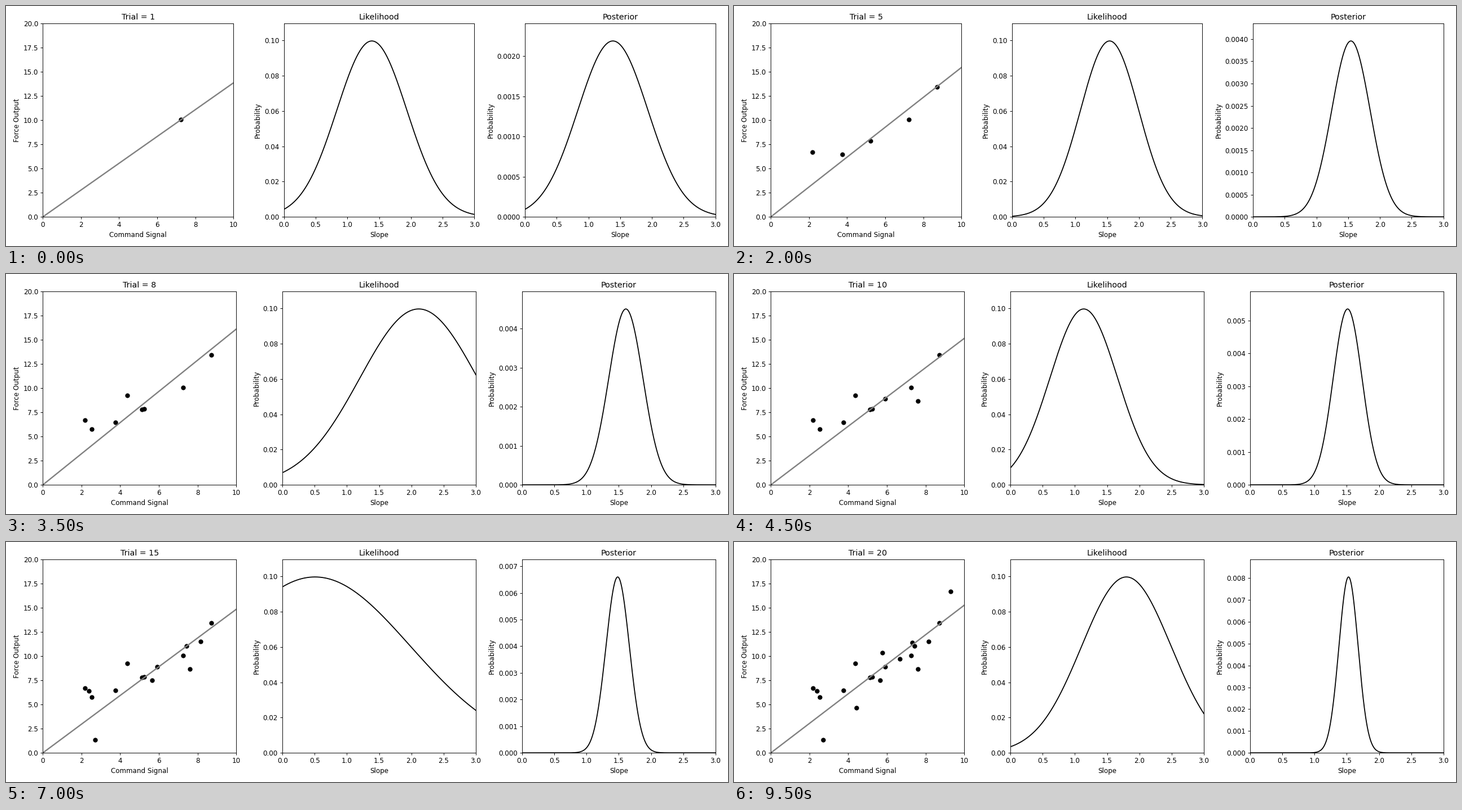
Animation of 1280x427 px, one loop 10000 ms. Source, as a matplotlib script:

```python
import numpy as np
import matplotlib.pyplot as plt
from matplotlib.animation import FuncAnimation

DPI = 256 / 3
SIZE = (15, 427 * 3 / 256)  # 1280 x 427 pixels
NOISE_SD = 4

# (command signal, force output) of each trial, in order
TRIALS = np.array([
    (7.25, 10.04), (5.238, 7.86), (3.747, 6.47), (2.17, 6.67), (8.717, 13.41),
    (5.115, 7.81), (2.533, 5.74), (4.37, 9.24), (5.90, 8.89), (7.60, 8.64),
    (2.38, 6.42), (7.42, 11.06), (5.637, 7.51), (8.168, 11.50), (2.70, 1.36),
    (9.284, 16.66), (7.303, 11.40), (4.44, 4.66), (6.678, 9.72), (5.761, 10.36),
])

slopes = np.linspace(0, 3, 1000)
x, y = TRIALS.T
residuals = y[:, None] - x[:, None] * slopes
likelihoods = np.exp(-0.5 * (residuals / NOISE_SD) ** 2) / (NOISE_SD * np.sqrt(2 * np.pi))
posteriors = np.cumprod(likelihoods, axis=0)  # flat prior
posteriors /= posteriors.sum(axis=1, keepdims=True)

plt.rcParams["font.family"] = "DejaVu Sans"
fig, (data_ax, like_ax, post_ax) = plt.subplots(1, 3, figsize=SIZE, dpi=DPI)


def draw_data(trial):
    best_slope = slopes[posteriors[trial].argmax()]
    data_ax.clear()
    data_ax.scatter(x[:trial + 1], y[:trial + 1], color="black")
    data_ax.plot([0, 10], [0, 10 * best_slope], color="gray", lw=2)
    data_ax.set(xlim=(0, 10), ylim=(0, 20), title=f"Trial = {trial + 1}",
                xlabel="Command Signal", ylabel="Force Output")


def draw_density(ax, density, title):
    ax.clear()
    ax.plot(slopes, density, color="black")
    ax.set(xlim=(0, 3), ylim=(0, 1.1 * density.max()), title=title,
           xlabel="Slope", ylabel="Probability")


def update(trial):
    draw_data(trial)
    draw_density(like_ax, likelihoods[trial], "Likelihood")
    draw_density(post_ax, posteriors[trial], "Posterior")
    fig.tight_layout()
    return []


anim = FuncAnimation(fig, update, frames=len(TRIALS), init_func=lambda: update(0),
                     interval=500, repeat=True, repeat_delay=0)
plt.show()
```
